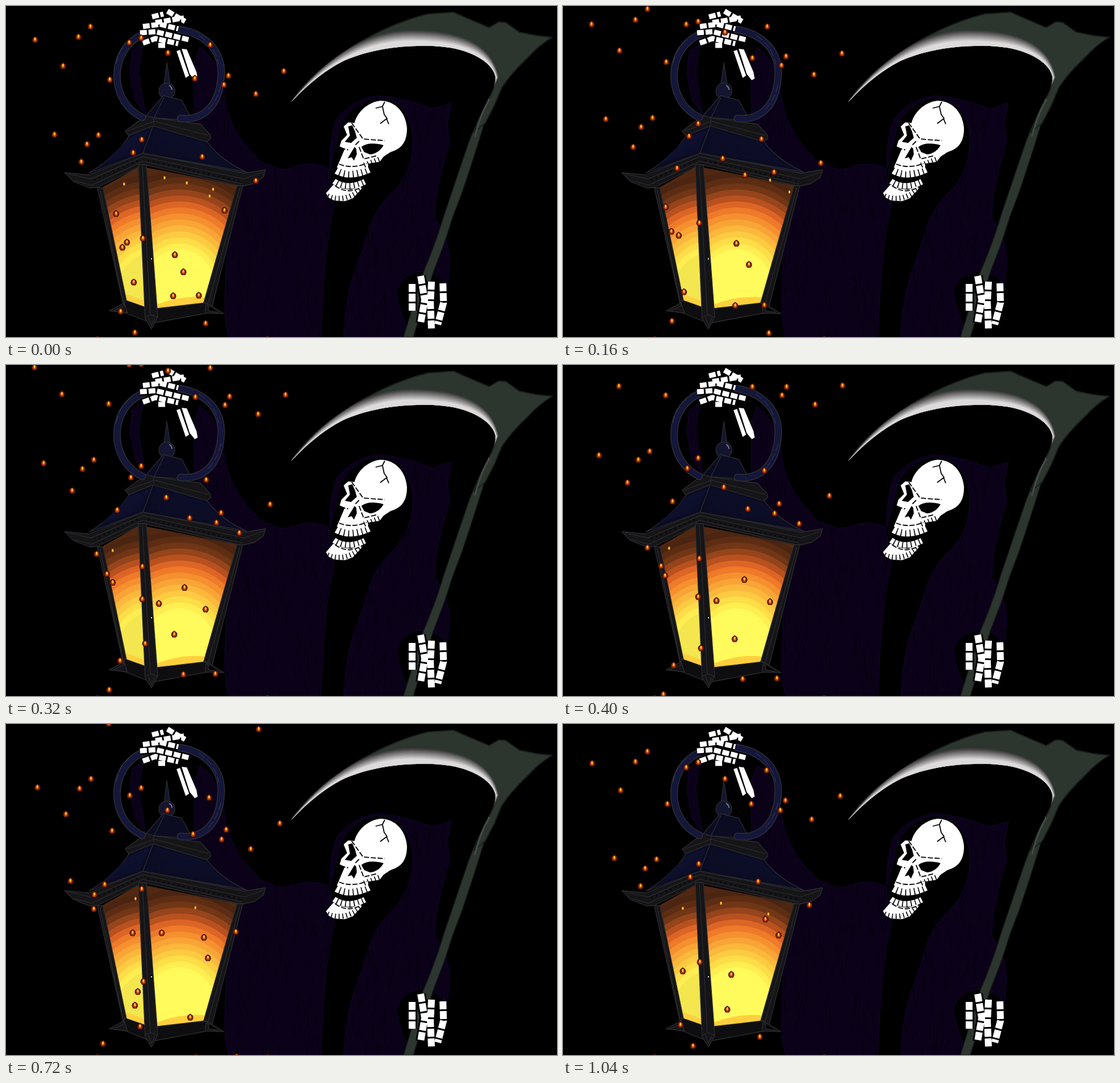
Animation, 966 px wide and 580 px high, one loop 1.12 s. Source, as an HTML page:

```html
<!DOCTYPE html>
<html lang="en">
<head>
<meta charset="utf-8">
<title>Reaper with lantern</title>
<style>
html, body { margin: 0; height: 100%; overflow: hidden; background: #000 }
svg { display: block; width: 966px; height: 580px }
.robe { fill: #0b0219; stroke: #10052a; stroke-width: 1 }
.iron { fill: #151518; stroke: #2c2c2e; stroke-width: 1.3; stroke-linejoin: round }
.roof { fill: #0b0c22; stroke: #2b2b32; stroke-width: 1.3 }
.line { fill: none; stroke: #2c2c30; stroke-width: 1.2 }
.ink { fill: none; stroke: #000; stroke-width: 1.8 }
.teeth { fill: none; stroke: #fff; stroke-dasharray: 6 1.6 }
.bones { fill: none; stroke-linejoin: round }
.ring { fill: none; stroke-linecap: round }
</style>
</head>
<body>
<svg viewBox="0 0 966 580">
<defs>
  <path id="body" d="M340 72C368 92 380 122 384 165C391 204 412 238 437 262Q446 277 460 277Q482 292 505 282Q535 270 566 284L576 350C563 400 557 470 552 580H390C380 545 384 500 386 440L330 240V100Z"/>
  <path id="hood" d="M568 285C566 245 573 215 580 198Q603 166 650 157Q700 160 747 180L781 170L774 205L778 240L765 285L754 335L752 372Q778 405 778 450L774 492Q762 470 735 465Q695 465 685 500Q690 540 712 580H592C594 520 604 480 626 425C640 370 655 345 684 320C706 290 716 262 712 222C705 180 680 160 650 161C612 168 585 195 582 232Z"/>
  <path id="cuff" d="M221 78L240 66L233 115L245 192L226 165L217 118Z"/>
  <clipPath id="robeClip"><use href="#body"/><use href="#hood"/><use href="#cuff"/></clipPath>
  <path id="blade" d="M500 168C520 138 552 108 590 82C635 52 690 26 740 14L785 11L800 18L847 38L864 28L876 29L900 46L930 52L957 55Q935 68 915 90Q885 118 869 143L856 174L840 205L820 222L845 165Q860 140 858 123Q853 103 825 88C795 72 760 69 720 70C670 71 625 81 590 97Q545 120 500 168Z"/>
  <clipPath id="bladeClip"><use href="#blade"/></clipPath>
  <clipPath id="leftPane"><path d="M169 318L234 281L244 527L211 516Z"/></clipPath>
  <clipPath id="rightPane"><path d="M246 283L406 315L347 520L265 530Z"/></clipPath>
  <path id="hoop" d="M239 195C174 164 181 60 256 45C318 27 383 62 377 124C374 174 347 201 306 197"/>
  <path id="raised" d="M256 19L276 14M283 9L314 27M262 29L312 21M240 36L270 32L302 40M235 47L262 45L320 59M240 65L262 57L302 66M267 69h12"/>
  <path id="grip" d="M712 487L712 534M727 473L734 515L727 556M746 483L744 520L746 568M766 486L767 520L757 558"/>
  <g id="ember">
    <path d="M0-6L4-3L5 1L3 5H-3L-5 1L-4-3Z" fill="#8a220a" stroke="#360c05"/>
    <ellipse cy="1" rx="2.6" ry="3" fill="#b93c0e"/>
    <use href="#flame"/>
  </g>
  <ellipse id="flame" cy="-1" rx="1.5" ry="2.7" fill="#ffd43a" stroke="#e8801a" stroke-width=".7"/>
</defs>
<rect width="966" height="580"/>

<g class="robe"><use href="#body"/><use href="#hood"/><use href="#cuff"/></g>
<path id="folds" class="line" clip-path="url(#robeClip)" style="stroke:#05010d"/>

<g id="skull" fill="#fff">
  <path d="M611 205C615 188 632 169 656 166C684 166 701 188 703 214C703 238 694 250 674 256L662 264L655 273L636 276L634 284L600 290L580 283L586 269L594 250L585 246L588 236L598 226L592 211L600 204Z"/>
  <path d="M574 313L561 328L566 336L576 341L594 342L608 337L622 322L626 314L605 322L590 320Z"/>
  <path class="teeth" stroke-width="15" d="M580 287Q602 300 636 285"/>
  <path class="teeth" stroke-width="10" d="M575 307Q598 323 629 308"/>
  <path d="M600 211L607 209L612 220L615 231L605 240L594 238L603 227ZM623 247Q636 237 662 244Q653 259 638 260L628 256ZM611 247L599 267L606 265L610 271L615 260L614 250Z" fill="#000"/>
  <path class="ink" d="M664 168L660 176L648 179M660 176L663 190L668 197L656 206M667 197L671 207"/>
  <path class="ink" stroke-dasharray="9 3" d="M606 205L626 233L664 236M619 237L612 244M619 247L627 268L652 262M586 249L600 252M584 277Q606 286 632 276M577 315Q600 332 625 316"/>
  <path class="ink" stroke-dasharray="1.6 5" style="stroke-width:9" d="M564 333Q592 345 622 322M628 279L656 268"/>
</g>

<path d="M845 165L856 174L838 207Q822 260 800 325L783 370Q773 402 766 422L749 466L714 580H697L732 466Q754 415 767 370L794 290L811 240Q822 210 845 165Z" fill="#2c362f" stroke="#171c19" stroke-width="1.5"/>
<use href="#blade" fill="#2c362f" stroke="#1b211d" stroke-width="2"/>
<g id="steel" clip-path="url(#bladeClip)"></g>
<path d="M848 164Q834 183 822 229" fill="none" stroke="#434a45" stroke-width="3"/>

<path class="iron" style="fill:#14152f" d="M282 99L288 139H277Z"/>
<circle class="iron" style="fill:#14152f" cx="282" cy="149" r="14"/>
<path d="M286 139q5 3 5 8" stroke="#777b92" fill="none" stroke-width="2"/>
<path class="roof" d="M276 157L308 165L327 201L259 196L246 192Z"/>
<path class="roof" d="M258 209L352 237Q375 270 422 291L240 258L145 293Q193 264 216 227Z"/>
<path id="grain" class="line" style="stroke:#0f1130;stroke-width:1"/>
<path class="iron" d="M246 192L260 196L341 207L358 226L359 232L352 238L258 210L215 227L209 219Z"/>
<path class="line" d="M277 160L259 197V208M258 210L240 258M213 219L260 202L355 227"/>
<g class="ring">
  <use href="#hoop" stroke="#2e2e33" stroke-width="13"/>
  <use href="#hoop" stroke="#14163a" stroke-width="10"/>
  <path d="M193 101Q198 75 216 60M338 51Q366 69 373 102M377 138Q371 164 355 181" stroke="#363b5c" stroke-dasharray="13 5"/>
</g>

<g id="left" clip-path="url(#leftPane)"></g>
<g id="right" clip-path="url(#rightPane)"></g>
<path d="M211 505L244 517V527L211 516ZM264 523Q310 506 350 511L347 520L265 530Z" fill="#ffd03e"/>
<path class="iron" d="M240 258L418 293L455 287L451 300L435 311L413 316L241 278L160 318L147 319L119 308L103 292L145 296Z"/>
<path class="line" d="M109 294L149 303L240 264L417 303L452 291M120 306L150 314L240 272L414 312"/>
<path d="M155 305L235 269M249 271L410 307" stroke="#050506" stroke-width="3" stroke-dasharray="2 7"/>
<g class="iron">
  <path d="M160 318L170 319L212 520L208 534Z"/>
  <path d="M405 315L415 315L361 528L346 522Z"/>
  <path d="M208 515L245 528L265 530L350 520L353 538L255 556L205 536Z" style="fill:#0e0e10"/>
  <path d="M181 534L207 520L213 538ZM188 534L207 526M351 520L382 539L349 538ZM355 525V534L372 537"/>
  <path d="M232 278H246L266 545L255 566L244 548Z"/>
</g>
<path class="line" d="M239 280L253 540M165 322L207 526M410 319L353 526M245 545L255 541L266 546M250 546L255 560L261 547"/>
<path d="M254 442h2v2h-2z" fill="#eee"/>

<path d="M299 79L305 77L321 122L315 126ZM308 75L317 76L334 116L336 127L331 130L322 119Z" fill="#fff"/>
<g class="bones">
  <use href="#raised" stroke="#000" stroke-width="14"/>
  <use href="#raised" stroke="#fff" stroke-width="9" stroke-dasharray="12 3"/>
  <use href="#grip" stroke="#000" stroke-width="18"/>
  <use href="#grip" stroke="#fff" stroke-width="12" stroke-dasharray="14 3"/>
</g>
<path d="M158 579h5v1h-5zM456 579h5v1h-5z" fill="#5a210c"/>
<g id="embers"></g>
</svg>
<script>
const $ = id => document.getElementById(id);

let seed = 7;
const rnd = (a, b) => (seed = seed * 16807 % 2147483647, a + (b - a) * seed / 2147483647);

let folds = '';
for (let i = 0; i < 420; i++)
  folds += `M${rnd(340, 780)} ${rnd(90, 570)}q${rnd(-5, 5)} 9 ${rnd(-5, 5)} ${rnd(14, 30)}`;
$('folds').setAttribute('d', folds);

let grain = '';
for (let k = 0; k <= 1; k += 1 / 29)
  grain += `M${262 + 82 * k} ${216 + 23 * k}L${256 + 130 * k} ${254 + 25 * k}`
    + `M${251 - 32 * k} ${217 + 13 * k}L${234 - 65 * k} ${255 + 22 * k}`;
$('grain').setAttribute('d', grain);

// Ever thinner and lighter crescents along the cutting edge
for (let i = 0; i < 8; i++) {
  const h = 27 - 2.5 * i, grey = 66 + 22 * i;
  $('steel').innerHTML += `<path fill="rgb(${grey},${grey - 2},${grey - 2})"
    d="M500 168Q600 ${65 - h} 720 ${70 - h}Q${840 + h / 3} ${72 - h} ${858 + h / 5} 125L845 165Z"/>`;
}

// Banded glow behind the glass
const glow = ['#4b2511', '#5d2d13', '#703616', '#95441b', '#b8511f', '#dc6526', '#ee7a2a',
  '#f5902f', '#f9a436', '#fbb83c', '#fccb42', '#fddd48', '#feee52'];
const bands = (cx, cy, core) => '<path d="M160 270h260v270h-260z" fill="#512812"/>'
  + [...glow, core].map((fill, i) => {
    const r = 212 - 10.5 * i;
    return `<ellipse cx="${cx}" cy="${cy}" rx="${r * .87}" ry="${r}" fill="${fill}"/>`;
  }).join('');
$('left').innerHTML = bands(258, 508, '#f3e64e');
$('right').innerHTML = bands(304, 502, '#fffb5c');

// The draught is stronger in the first half of each 14-step loop
const climb = s => {
  const r = s % 14;
  return (s - r) / 14 * 184 + (r < 7 ? r * 104 : 728 + (r - 7) * 80) / 7;
};

const embers = [];
// Gathers speed upwards while fanning out towards x1
const rise = (born, x, y, x1, pace) => embers.push([born, age => {
  const c = climb(born + age) - climb(born);
  const up = pace * c * c / (c + 40);
  const k = Math.min(1, up / (y + 10));
  return [x + (x1 - x) * (1 - (1 - k) ** 3), y - up];
}]);
const fall = (born, x, y, speed) =>
  embers.push([born, age => [x + speed * age, y + 8.4 * age]]);

rise(0, 193, 364, 50, .92);
rise(0, 212, 414, 98, .93);
rise(7, 237, 478, 127, 1.03);
rise(4, 187, 326, 148, 1.06);
rise(4, 239, 410, 180, 1.03);
rise(7, 228, 316, 216, 1.1);
rise(7, 241, 459, 237, .98);
rise(4, 268, 418, 284, 1.23);
rise(0, 317, 311, 332, 1.22);
rise(13, 295, 439, 358, 1.08);
rise(11, 353, 352, 384, 1.16);
rise(7, 344, 383, 392, 1.14);
rise(0, 311, 466, 490, 1.06);
rise(7, 348, 420, 443, 1.16);
fall(0, 224, 484, -6);
fall(9, 226, 493, -5);
fall(4, 244, 488, -1.8);
fall(13, 288, 500, 4.5);
fall(0, 338, 507, 7.3);
fall(4, 295, 472, 5.5);

function draw(step) {
  let out = '';
  for (const [born, path] of embers) {
    for (let age = (step - born + 14) % 14; ; age += 14) {
      const [x, y] = path(age).map(Math.round);
      if (y < -8 || y > 588) break;
      // Only the flame shows against the brown top of the glass
      const dim = y > 300 && y < 342 && x > 178 && x < 398 && (x < 232 || x > 250);
      out += `<use href="#${dim ? 'flame' : 'ember'}" x="${x}" y="${y}"/>`;
    }
  }
  $('embers').innerHTML = out;
}

let shown = -1;
function tick() {
  const step = Math.floor(performance.now() % 1120 / 80);
  if (step !== shown) draw(shown = step);
  requestAnimationFrame(tick);
}
tick();
</script>
</body>
</html>
```
